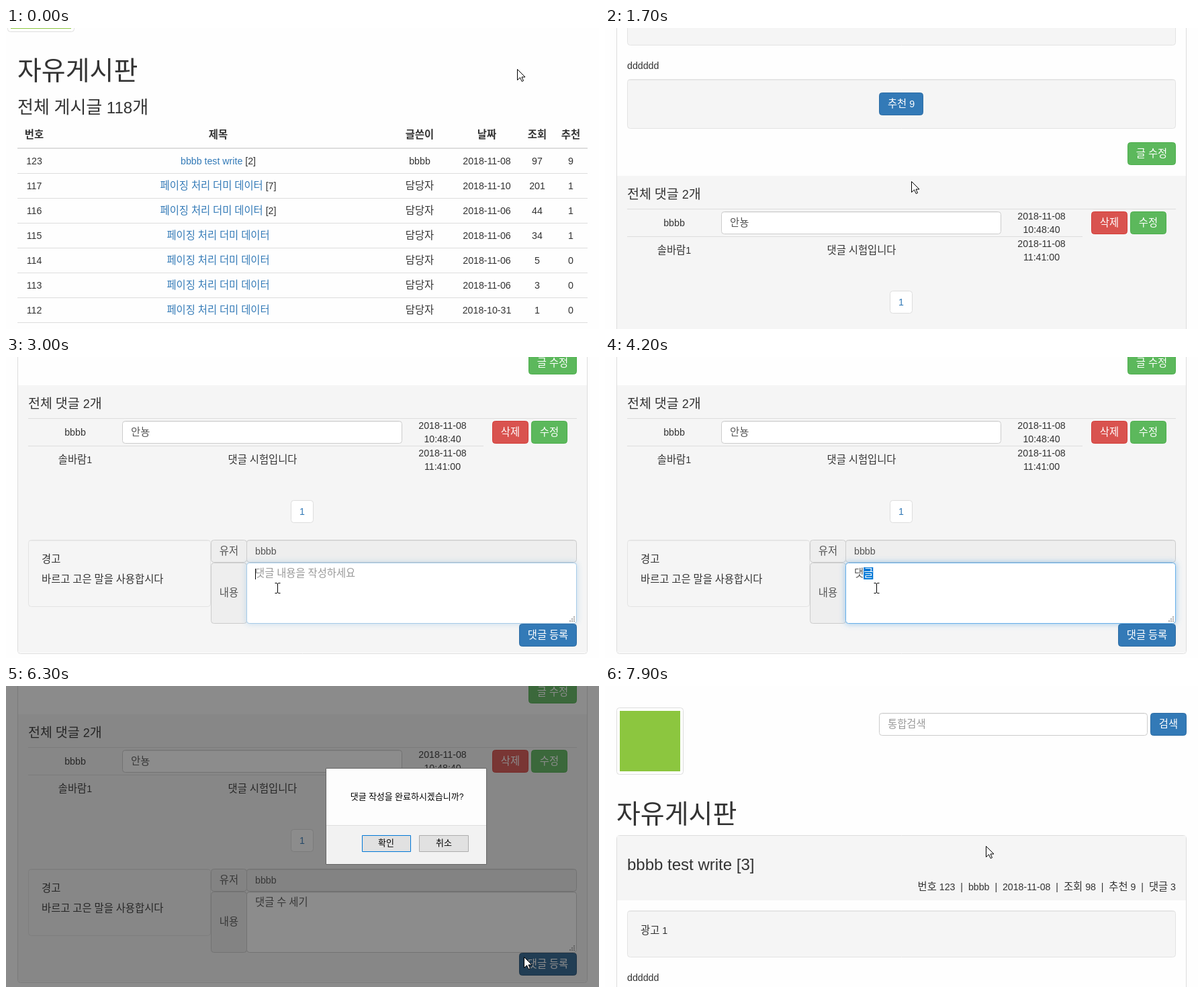
An HTML page with a canvas for the animation above (8000 ms loop, 883 by 448 pixels).

```html
<!DOCTYPE html>
<html lang="ko">
<head>
<meta charset="utf-8">
<title>자유게시판</title>
<style>
html, body { margin: 0; width: 100%; height: 100%; overflow: hidden; background: #fefefe; }
canvas { display: block; }
</style>
</head>
<body>
<canvas id="stage" width="883" height="448"></canvas>
<script>
const ctx = document.getElementById('stage').getContext('2d');
const LOOP = 8000, STEP = 100;
const PAPER = '#fefefe', INK = '#333', LINK = '#337ab7', GREY = '#f5f5f5', RULE = '#ddd';
const PRIMARY = ['#337ab7', '#2e6da4'], SUCCESS = ['#5cb85c', '#4cae4c'], DANGER = ['#d9534f', '#d43f3a'];
const USER = 'bbbb', ADMIN = '담당자', GUEST = '솔바람1', DUMMY = '페이징 처리 더미 데이터';

// ---- drawing helpers ----
// Hangul is set slightly larger than Latin so that one syllable is one em wide.
function runs(str, size, bold) {
  return (str.match(/[ㄱ-ㅎ가-힣]+|[^ㄱ-ㅎ가-힣]+/g) || []).map(s => {
    const hangul = /[ㄱ-힣]/.test(s);
    const font = (bold ? 'bold ' : '') + (hangul
      ? size * 1.083 + 'px "Noto Sans CJK KR", "Noto Sans CJK", sans-serif'
      : size + 'px "Liberation Sans", Arial, sans-serif');
    ctx.font = font;
    return { s, font, w: ctx.measureText(s).width };
  });
}
const sum = list => list.reduce((total, r) => total + r.w, 0);
const widthOf = (str, size = 14.2) => sum(runs(str, size));

// Draws text vertically centred on cy and returns its right edge.
function text(str, x, cy, { size = 14.2, color = INK, align = 0, bold = false } = {}) {
  const list = runs(String(str), size, bold);
  x -= sum(list) * align;
  ctx.fillStyle = color;
  for (const r of list) {
    ctx.font = r.font;
    ctx.fillText(r.s, x, Math.round(cy + size * 0.36));
    x += r.w;
  }
  return x;
}
const centred = (str, x, cy, options) => text(str, x, cy, { align: 0.5, ...options });

function rect(x, y, w, h, color) {
  ctx.fillStyle = color;
  ctx.fillRect(x, y, w, h);
}
function box(x, y, w, h, fill, stroke, radius = 4, inset = false) {
  ctx.beginPath();
  ctx.roundRect(x + 0.5, y + 0.5, w - 1, h - 1, radius);
  ctx.fillStyle = fill;
  ctx.fill();
  if (inset) rect(x + 2, y + 1, w - 4, 1, 'rgba(0,0,0,.06)');
  ctx.strokeStyle = stroke;
  ctx.lineWidth = 1;
  ctx.stroke();
}
function button(label, x, y, w, [fill, stroke]) {
  box(x, y, w, 34, fill, stroke);
  centred(label, x + w / 2, y + 17, { color: '#fff' });
}
const well = (x, y, w, h) => box(x, y, w, h, GREY, '#e3e3e3', 4, true);
const field = (x, y, w, h, fill = '#fff', radius = 4) => box(x, y, w, h, fill, '#ccc', radius, true);
function thumbnail(x, y) {
  box(x, y, 100, 100, '#fff', RULE);
  rect(x + 5, y + 5, 90, 90, '#8cc63f');
}

// ---- timeline ----
// Rows of [time, ...values], starting at time 0; numbers are interpolated.
function track(keys, t) {
  let i = keys.length - 1;
  while (i > 0 && keys[i][0] > t) i--;
  const a = keys[i], b = keys[i + 1] || a;
  const p = b === a ? 0 : (t - a[0]) / (b[0] - a[0]);
  return a.slice(1).map((v, k) => typeof v === 'number' ? v + (b[k + 1] - v) * p : v);
}
const SCROLL = [
  [0, 0], [1400, 0], [1500, 90], [1600, 240], [1700, 378], [1900, 378],
  [2000, 419], [2100, 506], [2200, 545], [2300, 556], [7500, 556], [7600, 0]
];
const POINTER = [
  [0, 761, 61, 'arrow'], [100, 740, 63, 'arrow'], [200, 578, 83, 'arrow'], [300, 424, 131, 'arrow'],
  [500, 370, 161, 'arrow'], [700, 351, 194, 'hand'], [800, 349, 200, 'hand'], [1000, 349, 200, 'hand'],
  [1100, 455, 227, 'arrow'], [1300, 456, 228, 'arrow'], [2200, 456, 228, 'arrow'],
  [2400, 640, 355, 'beam'], [2700, 405, 372, 'beam'], [2800, 404, 344, 'beam'], [5400, 404, 344, 'beam'],
  [5500, 490, 406, 'beam'], [5600, 580, 415, 'arrow'], [5900, 765, 405, 'hand'], [6000, 771, 403, 'hand'],
  [6300, 771, 403, 'arrow'], [6400, 771, 403, 'arrow'], [6700, 640, 290, 'arrow'],
  [7000, 570, 240, 'arrow'], [7100, 568, 238, 'arrow'], [7800, 568, 238, 'arrow'], [7900, 567, 238, 'arrow']
];
// [time, committed text, syllable being composed]
const TYPING = [
  [0, '', ''], [3300, '', 'ㄷ'], [3800, '', '대'], [3900, '', '댓'], [4100, '댓', '그'], [4200, '댓', '글'],
  [4300, '댓글 ', 'ㅅ'], [4400, '댓글 ', '수'], [4500, '댓글 수 ', ''], [4700, '댓글 수 ', 'ㅅ'],
  [4800, '댓글 수 ', '세'], [4900, '댓글 수 세', 'ㄱ'], [5000, '댓글 수 세', '기'], [6100, '댓글 수 세기', '']
];
const clamp = v => Math.max(0, Math.min(1, v));

// ---- pages ----
const COLUMNS = [['번호', 42], ['제목', 316], ['글쓴이', 616], ['날짜', 716], ['조회', 791], ['추천', 841]];
const POSTS = [
  [123, USER + ' test write', ' [2]', USER, '2018-11-08', 97, 9],
  [117, DUMMY, ' [7]', ADMIN, '2018-11-10', 201, 1],
  [116, DUMMY, ' [2]', ADMIN, '2018-11-06', 44, 1],
  [115, DUMMY, '', ADMIN, '2018-11-06', 34, 1],
  [114, DUMMY, '', ADMIN, '2018-11-06', 5, 0],
  [113, DUMMY, '', ADMIN, '2018-11-06', 3, 0],
  [112, DUMMY, '', ADMIN, '2018-10-31', 1, 0]
];

function listPage(t) {
  thumbnail(2, -94);
  text('자유게시판', 17, 64, { size: 36 });
  text('전체 게시글 118개', 17, 118, { size: 24 });
  for (const [label, x] of COLUMNS) centred(label, x, 159, { bold: true });
  rect(17, 178, 849, 2, RULE);
  if (t >= 1000) rect(17, 180, 849, 36, GREY);
  POSTS.forEach(([id, title, count, ...rest], i) => {
    const cy = 198 + 37 * i, x = 316 - widthOf(title + count) / 2;
    const hover = i === 0 && t >= 700;
    const end = text(title, x, cy, { color: hover ? '#23527c' : LINK });
    if (hover) rect(x, cy + 7, end - x, 1, '#23527c');
    text(count, end, cy);
    centred(id, 42, cy);
    rest.forEach((value, k) => centred(value, COLUMNS[k + 2][1], cy));
    rect(17, cy + 18, 849, 1, RULE);
  });
}

function commentForm(t) {
  well(33, 828, 272, 100);
  text('경고', 53, 857);
  text('바르고 고은 말을 사용합시다', 53, 887);
  box(305, 828, 54, 34, '#eee', '#ccc');
  field(358, 828, 492, 34, '#eee');
  centred('유저', 332, 845, { color: '#555' });
  text(USER, 371, 845, { color: '#555' });

  box(305, 862, 54, 91, '#eee', '#ccc');
  centred('내용', 332, 907, { color: '#555' });
  const focus = clamp(t < 6100 ? (t - 2900) / 200 : (6300 - t) / 200);
  ctx.save();
  ctx.shadowColor = `rgba(102,175,233,${0.6 * focus})`;
  ctx.shadowBlur = 8;
  field(358, 862, 492, 91);
  ctx.restore();
  if (focus) box(358, 862, 492, 91, '#fff', `rgba(102,175,233,${focus})`);
  for (let i = 0; i < 3; i++)
    for (let j = 0; j <= i; j++) rect(845 - 3 * j, 942 + 3 * i, 2, 2, '#aaa');

  const [done, composing] = TYPING.filter(k => k[0] <= t).pop().slice(1);
  if (!done && !composing) text('댓글 내용을 작성하세요', 371, 878, { color: '#999' });
  const x = text(done, 371, 878, { color: '#555' });
  if (composing) {
    rect(x, 869, widthOf(composing), 18, '#0078d7');
    text(composing, x, 878, { color: '#fff' });
  } else if (t >= 2900 && t < 6100) {
    rect(Math.round(x), 871, 1, 16, '#000');
  }
  button('댓글 등록', 764, 953, 86, t >= 5900 && t < 7300 ? ['#286090', '#204d74'] : PRIMARY);
}

function postPage(t) {
  const later = t >= 7600, replies = later ? 3 : 2;
  ctx.save();
  ctx.translate(0, -Math.round(track(SCROLL, t)[0]));
  thumbnail(17, 32);
  field(408, 40, 400, 34);
  text('통합검색', 421, 57, { color: '#999' });
  button('검색', 812, 40, 54, PRIMARY);
  text('자유게시판', 17, 191, { size: 36 });

  box(17, 222, 849, 776, PAPER, RULE);
  rect(18, 223, 847, 96, GREY);
  rect(18, 598, 847, 398, GREY);
  text(`${USER} test write [${replies}]`, 33, 265.5, { size: 24 });
  const meta = ['번호 123', USER, '2018-11-08', '조회 ' + (later ? 98 : 97), '추천 9', '댓글 ' + replies];
  text(meta.join('  |  '), 850, 299, { align: 1 });
  well(33, 334, 817, 70);
  text('광고 1', 53, 364);
  text('dddddd', 33, 434);
  well(33, 454, 817, 74);
  button('추천 9', 408, 474, 66, PRIMARY);
  button('글 수정', 778, 548, 72, SUCCESS);

  text('전체 댓글 2개', 33, 626, { size: 18 });
  rect(33, 647, 817, 1, RULE);
  rect(33, 688, 678, 1, RULE);
  centred(USER, 103, 668);
  field(173, 651, 417, 34);
  text('안뇽', 186, 668, { color: '#555' });
  button('삭제', 724, 651, 54, DANGER);
  button('수정', 782, 651, 54, SUCCESS);
  centred(GUEST, 103, 709);
  centred('댓글 시험입니다', 382, 709);
  ['10:48:40', '11:41:00'].forEach((time, i) => {
    centred('2018-11-08', 650, 658 + 41 * i);
    centred(time, 650, 678 + 41 * i);
  });
  box(424, 769, 34, 34, '#fff', RULE);
  centred('1', 441, 786, { color: LINK });
  commentForm(t);
  ctx.restore();
}

function dialog(t) {
  const hover = t >= 7000;
  rect(0, 0, 883, 448, 'rgba(26,26,26,.5)');
  box(476, 122, 240, 144, '#f2f2f2', '#666', 0);
  rect(477, 123, 238, 84, '#fdfdfd');
  rect(477, 207, 238, 1, '#dfdfdf');
  centred('댓글 작성을 완료하시겠습니까?', 597, 165, { size: 12, color: '#000' });
  box(530, 222, 73, 25, hover ? '#cce4f7' : '#e1e1e1', hover ? '#005499' : '#0078d7', 0);
  box(615, 222, 74, 25, '#e1e1e1', '#adadad', 0);
  centred('확인', 566, 234, { size: 12, color: '#000' });
  centred('취소', 652, 234, { size: 12, color: '#000' });
}

const SHAPES = {
  arrow: new Path2D('M.5 .5V16.5L4.5 12.8L7.2 18.5L9.5 17.5L7 12H12Z'),
  hand: new Path2D('M-1.5 1.5Q0 -.5 1.5 1.5V8Q4 6.5 5 8.5Q7.5 7 8.5 9.5Q11 9 11 11V15L9 20.5H0L-5 13Q-5.5 10 -1.5 13Z'),
  beam: new Path2D('M-3.5 -7.5H-1L.5 -6.5L2 -7.5H4.5M.5 -6.5V6.5M-3.5 7.5H-1L.5 6.5L2 7.5H4.5')
};
function pointer(t) {
  const [x, y, kind] = track(POINTER, t);
  ctx.save();
  ctx.translate(Math.round(x), Math.round(y));
  ctx.fillStyle = '#fff';
  ctx.strokeStyle = '#000';
  ctx.lineWidth = 1;
  if (kind !== 'beam') ctx.fill(SHAPES[kind]);
  ctx.stroke(SHAPES[kind]);
  ctx.restore();
}

function draw() {
  const t = Math.floor(performance.now() % LOOP / STEP) * STEP;
  rect(0, 0, 883, 448, PAPER);
  if (t < 1100) listPage(t); else postPage(t);
  if (t >= 6200 && t < 7300) dialog(t);
  pointer(t);
  requestAnimationFrame(draw);
}
draw();
</script>
</body>
</html>
```
